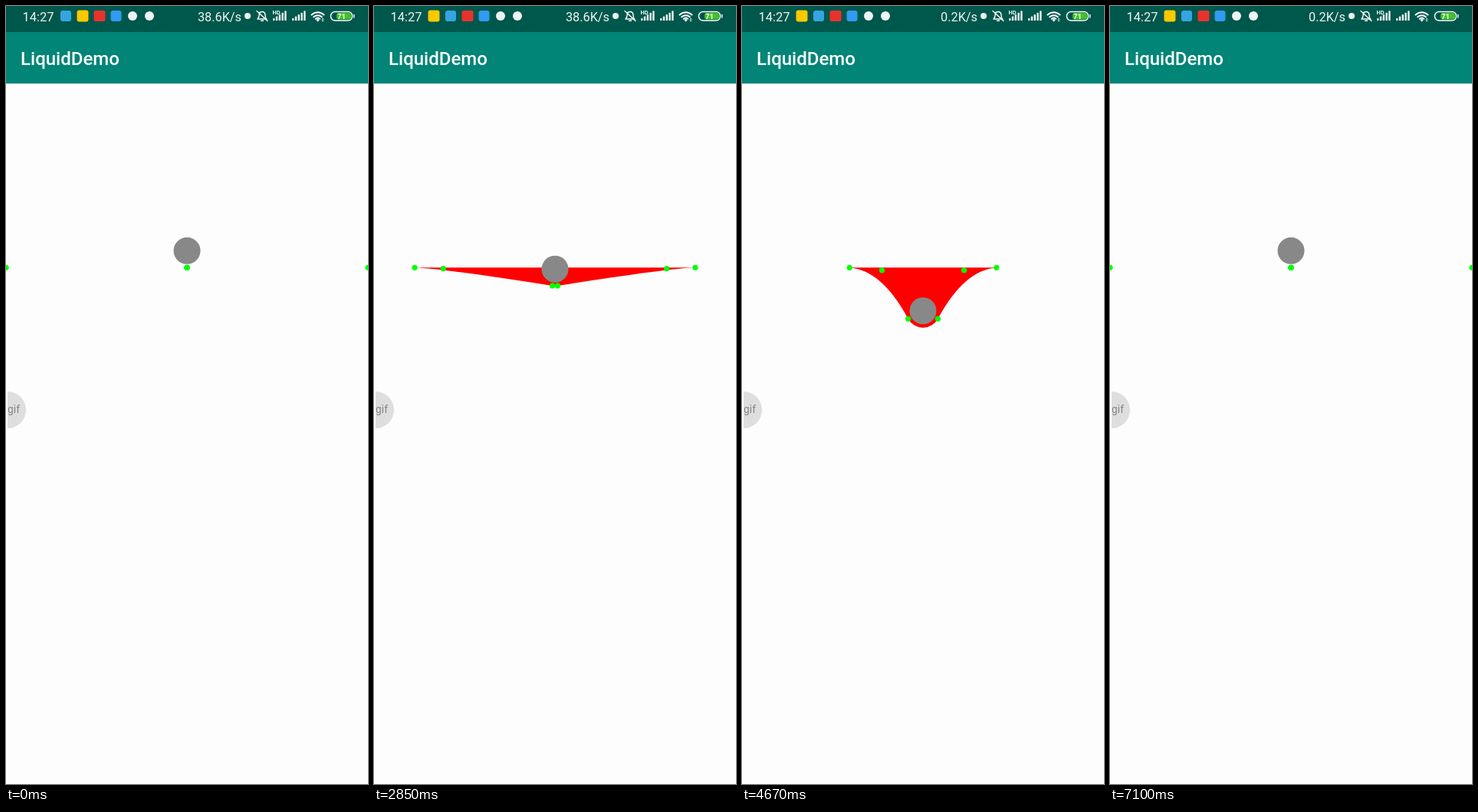
Write an HTML page that moves like this. It is 472 by 1015 pixels and loops after 7.2 s.

```html
<!DOCTYPE html>
<html lang="en">
<head>
<meta charset="utf-8">
<title>LiquidDemo</title>
<style>
html, body { margin: 0; width: 100%; height: 100%; overflow: hidden; background: #fefdfe; }
svg { display: block; font-family: Roboto, "Noto Sans", sans-serif; }
.line { fill: none; stroke: #fff; stroke-width: 1.4; stroke-linecap: round; }
</style>
</head>
<body>
<svg width="472" height="1015" viewBox="0 0 472 1015">
  <rect width="472" height="1015" fill="#fefdfe"/>
  <rect y="101" width="472" height="1" fill="#d9e3e1"/>
  <rect y="34" width="472" height="67" fill="#008577"/>
  <rect width="472" height="34" fill="#00574b"/>
  <text x="19" y="77" font-size="24" font-weight="500" fill="#fff">LiquidDemo</text>

  <g fill="#eef5f3">
    <text x="21.5" y="19.5" font-size="16.5">14:27</text>
    <text id="speed" x="307" y="19.5" font-size="16.3" text-anchor="end">38.6K/s</text>
    <circle cx="165" cy="13" r="6"/>
    <circle cx="187" cy="13" r="6"/>
    <circle cx="315" cy="13" r="4"/>
    <text x="347.5" y="11" font-size="7.5" font-weight="700">HD</text>
    <g id="bars"></g>
    <circle cx="406.5" cy="18.5" r="1.7"/>
    <path d="M411.5 17.5l1.5-2 1.5 2zM411.5 18.5l1.5 2 1.5-2z"/>
  </g>
  <rect id="iconA" y="6" width="14" height="14" rx="3" fill="#35a5e2"/>
  <rect id="iconB" y="5.5" width="15" height="15" rx="3" fill="#ffc800"/>
  <rect x="114.5" y="6" width="15" height="14" rx="2" fill="#e8332c"/>
  <rect x="136.5" y="6" width="14" height="14" rx="3" fill="#2f9cf2"/>

  <g class="line">
    <path d="M328 17h11.5q-1.500-2-1.500-5 0-4.500-4-4.500t-4 4.500q0 3-2 5M332.500 19.300h3M327 6.500l14 13"/>
    <path stroke-width="2" d="M398.500 11.500a11.500 11.500 0 0 1 16 0M401.200 14.300a7.600 7.600 0 0 1 10.600 0M403.800 16.800a4 4 0 0 1 5.400 0"/>
    <rect x="423.5" y="7.5" width="28" height="11.5" rx="5.5"/>
    <path d="M453.700 11.500v3.500"/>
  </g>
  <rect x="431" y="9" width="19" height="8.5" rx="3.5" fill="#43c322"/>
  <text x="437.5" y="16.7" font-size="9.5" font-weight="700" text-anchor="middle" fill="#fff">71</text>

  <path d="M2 503a24 24 0 0 1 0 48z" fill="#dedede"/>
  <text x="2" y="530.5" font-size="14" fill="#858585">gif</text>

  <path id="drop" fill="#f00"/>
  <circle id="knob" cx="236" r="17.5" fill="#888"/>
  <g id="dots" fill="#0f0"></g>
</svg>
<script>
const $ = id => document.getElementById(id);
const LOOP = 7200, MID = 236, TOP = 341.3, R = 22, PULL = 152.5;
const mix = (a, b, k) => a + (b - a) * k;

for (const x of [348, 373])
  for (let i = 0; i < 5; i++) {
    const h = 3 + i * 2.4;
    $('bars').innerHTML += `<rect x="${x + i * 3.8}" y="${19 - h}" width="2.4" height="${h}"/>`;
  }
$('dots').innerHTML = '<circle r="3.6"/>'.repeat(6);

// Pull progress: first step, last step, step count, final value
const moves = [
  [600, 970, 6, .315], [1080, 1260, 3, .823], [1650, 1690, 2, 1],
  [2350, 2850, 6, .157], [2930, 3030, 2, .039], [3130, 3130, 1, 0],
  [3310, 3980, 8, .215], [4080, 4770, 8, .557], [4870, 5360, 6, .823],
  [5460, 5560, 2, .926], [5660, 5660, 1, .99], [6040, 6040, 1, 1],
  [6190, 6710, 7, .029], [7100, 7100, 1, 0]
];

function progress(t) {
  let p = 0;
  for (const [from, to, steps, end] of moves) {
    if (t < from) break;
    const gap = (to - from) / (steps - 1 || 1) || 1;
    const k = Math.min(steps, Math.floor((t - from) / gap + .05) + 1) / steps;
    // Release slows down, dragging is even
    p = end < p ? mix(Math.sqrt(p), Math.sqrt(end), k) ** 2 : mix(p, end, k);
  }
  return p;
}

function drawDrop(p) {
  const slow = 1 - (1 - p) ** 2;
  const half = mix(472, 105, slow) / 2;
  const cy = TOP + p * PULL - R;
  const q = p + p * (1 - p) * (.27 - .2 * p);
  const turn = Math.max((1 - Math.cos(Math.PI * q)) / 2, .27 * p);
  const angle = turn * 105 * Math.PI / 180;
  const endX = R * Math.sin(angle), endY = cy + R * Math.cos(angle);
  const ctrlY = TOP + 4.4 * slow;
  const ctrlX = p ? endX + (endY - ctrlY) / Math.tan(angle) : 0;

  $('knob').setAttribute('cy', cy);
  $('drop').setAttribute('d', p ? `M${MID - half} ${TOP}` +
    `Q${MID - ctrlX} ${ctrlY} ${MID - endX} ${endY}` +
    `A${R} ${R} 0 ${+(angle > Math.PI / 2)} 0 ${MID + endX} ${endY}` +
    `Q${MID + ctrlX} ${ctrlY} ${MID + half} ${TOP}Z` : '');

  [[half, TOP], [ctrlX, p ? ctrlY : TOP], [endX, endY]].forEach(([x, y], i) => {
    [-x, x].forEach((dx, side) => {
      const dot = $('dots').children[i * 2 + side];
      dot.setAttribute('cx', MID + dx);
      dot.setAttribute('cy', y);
    });
  });
}

function frame(now) {
  const t = now % LOOP;
  const swapped = t >= 400;
  $('iconA').setAttribute('x', swapped ? 93 : 71);
  $('iconB').setAttribute('x', swapped ? 70.5 : 92.5);
  $('speed').textContent = t < 3600 ? '38.6K/s' : '0.2K/s';
  drawDrop(progress(t));
  requestAnimationFrame(frame);
}
frame(0);
</script>
</body>
</html>
```
